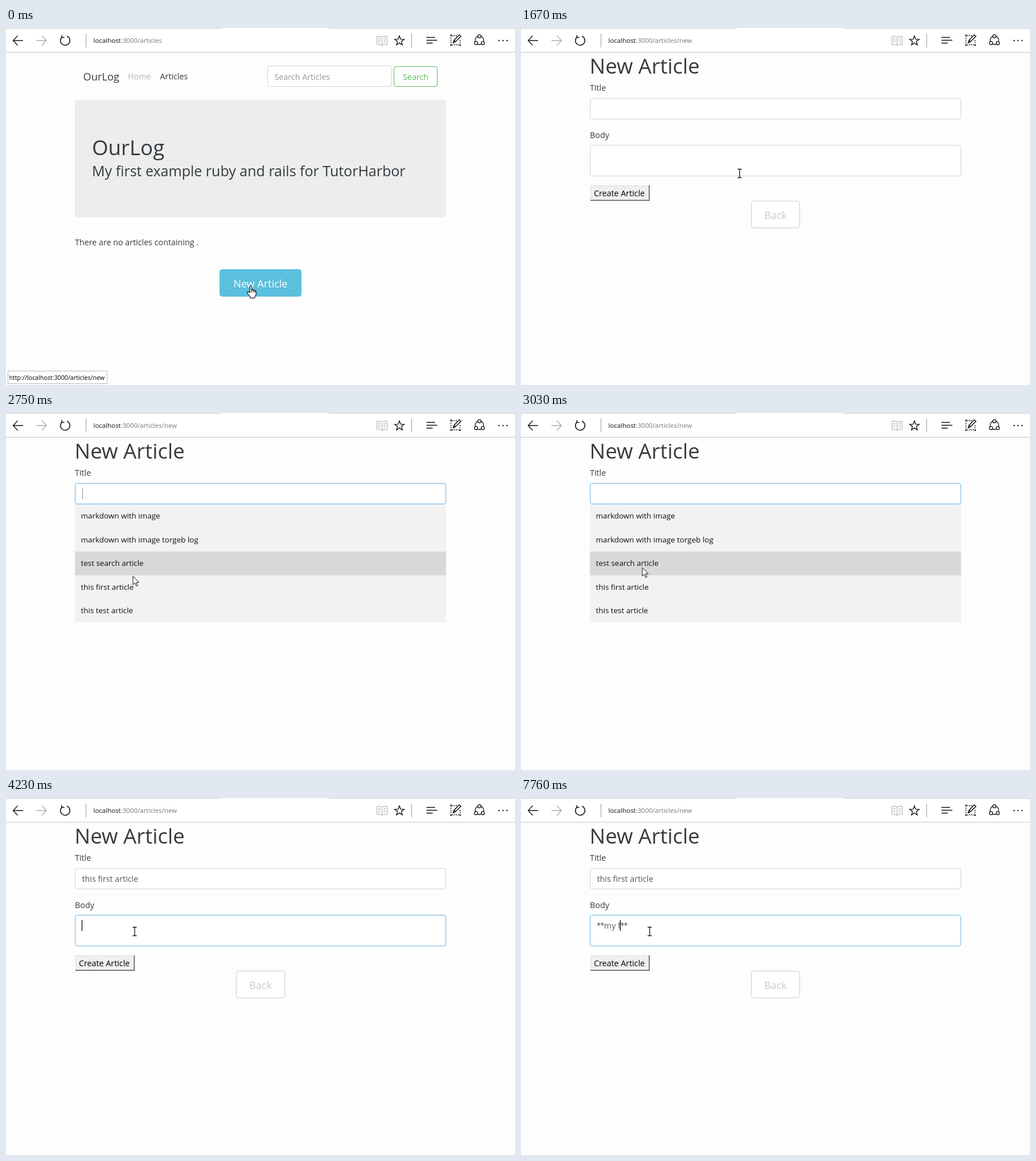
An HTML page that plays this animation: 894x626 px, repeating every 8000 ms.

```html
<!DOCTYPE html>
<html lang="en">
<head>
<meta charset="utf-8">
<title>New article form</title>
<style>
  html, body { margin: 0; width: 100%; height: 100%; overflow: hidden; background: #fdfdfd; }
  svg { display: block; width: 894px; height: 626px; }
  text { font: 14.3px "Open Sans", "Noto Sans", sans-serif; fill: #373a3c; white-space: pre; }
  .h1 { font-size: 36.7px; }
  .h3 { font-size: 25px; }
  .large { font-size: 18px; }
  .brand { font-size: 18.3px; }
  .row { font-size: 13.45px; fill: #111; }
  .url { font-size: 11.5px; fill: #767676; }
  .tip { font-size: 10.7px; fill: #000; }
  .mid { text-anchor: middle; }
  .value { fill: #55595c; }
  .star { font-family: Roboto, sans-serif; }
  .field { fill: #fff; stroke: #d3d3d3; }
  .field.focus { stroke: #66afe9; }
  .icon { fill: none; stroke: #111; stroke-width: 1.3; }
  .dim { stroke: #aaa; }
</style>
</head>
<body>
<svg viewBox="0 0 894 626">
  <rect width="894" height="626" fill="#fdfdfd"/>

  <!-- Browser bar -->
  <rect width="894" height="42" fill="#fff"/>
  <path d="M0 .5H378M567 .5H894M0 42.5H894" stroke="#c8c8c8"/>
  <g class="icon">
    <path d="M30 22H12.5M20.5 13.5L12.5 22L20.5 30.5"/>
    <path class="dim" d="M53.5 22H71M63 13.5L71 22L63 30.5"/>
    <path d="M99 15.3A8.3 8.3 0 1 0 107 14.3M98 12.5V16.5H102.5" stroke-width="1.5"/>
    <path d="M140.5 10V34M712.5 10V34" stroke="#999" stroke-width="1"/>
    <path class="dim" d="M651.5 14.5H658L660.5 16L663 14.5H669.5V29H663L660.5 30.5L658 29H651.5ZM660.5 16V30M654 18.5H657.5M654 21.5H657.5M654 24.5H657.5M663.5 18.5H667M663.5 21.5H667M663.5 24.5H667" stroke-width="1"/>
    <path id="bookmark"/>
    <path d="M738.5 16.5H753.5M738.5 21.5H757.5M738.5 26.5H749.5"/>
    <path d="M792 13.5H781.5V29.5H797.5V20" stroke-dasharray="2 1.5"/>
    <path d="M785.5 26L787 21.5L796 12L799 14.5L789.5 24ZM787 21.5L789.5 24M780 12.5H783M780 30.5H783M796 30.5H799" stroke-width="1.5"/>
    <circle cx="831.5" cy="21.5" r="7.5"/>
    <g fill="#fff">
      <circle cx="831.5" cy="14.5" r="2.8"/>
      <circle cx="825.5" cy="26.5" r="2.8"/>
      <circle cx="837.5" cy="26.5" r="2.8"/>
    </g>
  </g>
  <g fill="#111"><circle cx="866" cy="22" r="1.2"/><circle cx="873" cy="22" r="1.2"/><circle cx="880" cy="22" r="1.2"/></g>
  <text class="url" x="153.5" y="26"><tspan fill="#111">localhost</tspan>:3000/articles<tspan id="path"></tspan></text>

  <!-- Article list -->
  <g id="list">
    <text class="brand" x="135.5" y="92">OurLog</text>
    <text x="214" y="90" style="fill:#b5b6b7">Home</text>
    <text x="270.5" y="90">Articles</text>
    <rect class="field" x="459.5" y="66.5" width="218" height="36" rx="3.5"/>
    <text x="471.5" y="91" style="fill:#999">Search Articles</text>
    <rect x="681.5" y="67.5" width="76" height="35" rx="3.5" fill="#fff" stroke="#5cb85c"/>
    <text class="mid" x="719.5" y="91" style="fill:#5cb85c">Search</text>
    <rect x="121" y="126.5" width="652" height="205.5" rx="5" fill="#ebedee"/>
    <text class="h1" x="151" y="223">OurLog</text>
    <text class="h3" x="151" y="260">My first example ruby and rails for TutorHarbor</text>
    <text x="121" y="380.5">There are no articles containing .</text>
    <rect id="add" x="375.5" y="423.5" width="143" height="47" rx="4"/>
    <text class="large mid" x="447" y="455" style="fill:#fff">New Article</text>
  </g>

  <!-- Article form -->
  <g id="form">
    <text class="h1" x="120.5" y="80">New Article</text>
    <text x="121" y="110">Title</text>
    <rect id="title" class="field" x="121.5" y="123.5" width="651" height="36" rx="3.5"/>
    <text id="titleText" class="value" x="133.5" y="147">this first article</text>
    <path id="titleCaret" d="M134.5 131V151" stroke="#888"/>
    <text x="121" y="192.5">Body</text>
    <rect id="body" class="field" x="121.5" y="205.5" width="651" height="54" rx="3.5"/>
    <text id="bodyText" class="value" x="133.5" y="229"></text>
    <path id="bodyCaret" d="M0 214V233" stroke="#000" stroke-width="1.3"/>
    <rect x="122" y="276" width="104" height="27" fill="#efefef"/>
    <path d="M122.5 302V276.5H225" fill="none" stroke="#e0e0e0"/>
    <path d="M122 302.3H225.3V276" fill="none" stroke="#555" stroke-width="1.5"/>
    <text x="128" y="295" style="fill:#000">Create Article</text>
    <rect id="back" x="404.5" y="303.5" width="85" height="47" rx="4" stroke="#ccc"/>
    <text id="backText" class="large mid" x="447" y="335">Back</text>
    <g id="menu">
      <rect x="121" y="160" width="652" height="207" fill="#f2f2f2"/>
      <rect id="pick" x="121" width="652" height="41.5" fill="#d8d8d8"/>
    </g>
  </g>

  <g id="status">
    <rect id="statusBox" x="3.5" y="601.5" width="174" height="22" stroke="#bbb"/>
    <text id="statusText" class="tip" x="5.5" y="616.5"></text>
  </g>

  <!-- Pointers, hot spot at 0,0 -->
  <g id="hand" fill="#fff" stroke="#000" stroke-width="1.1" stroke-linejoin="round">
    <path d="M-1.5 11V.5Q-1.5-1 0-1T1.500.5V6.500Q3 5 4.500 7Q6 5.800 7.300 7.800Q9 7 9.300 9V14.500L7 18V20.500H-1V18.500L-6 12Q-7 9.500-4.500 9.500Z"/>
    <path d="M1.5 6V10M4.5 7V10.5M7.3 8V11" fill="none"/>
  </g>
  <path id="beam" d="M-3.5-7.5H-1L0-6.5L1-7.5H3.5M0-6.5V6.5M-3.5 7.5H-1L0 6.5L1 7.5H3.5" fill="none" stroke="#111" stroke-width="1.3"/>
  <path id="arrow" d="M0 0V15L3.5 11.8L6 17.5L8.3 16.5L5.8 11H10.5Z" fill="#fff" stroke="#111"/>
</svg>

<script>
const LOOP = 8000;
const $ = id => document.getElementById(id);
const show = (id, on) => { $(id).style.display = on ? "" : "none"; };

// Each track lists [start, ...values]; a value holds until the next start.
const pointer = [
  [0, "hand", 430, 453], [560, "hand", 446, 436], [700, "arrow", 547, 171],
  [850, "arrow", 530, 300], [980, "hand", 470, 432], [1110, "hand", 457, 428],
  [1670, "beam", 384, 255], [1820, "beam", 330, 207], [1960, "beam", 282, 168],
  [2090, "beam", 252, 147], [2230, "beam", 246, 143], [2630, "arrow", 232, 222],
  [2750, "arrow", 223, 286], [2870, "arrow", 218, 279], [3030, "arrow", 213, 271],
  [3180, "arrow", 211, 284], [3310, "arrow", 209, 298], [3450, "arrow", 208, 303],
  [3850, "hand", 415, 322], [3980, "beam", 300, 250], [4110, "beam", 240, 238],
  [4230, "beam", 226, 234]
];
const addButton = [
  [0, "#5bc0de", "#5bc0de"], [560, "#31b0d5", "#2aabd2"], [700, "#5bc0de", "#5bc0de"],
  [980, "#31b0d5", "#2aabd2"], [1250, "#269abc", "#1f7e9a"], [1550, "#31b0d5", "#2aabd2"]
];
const status = [
  [0, "/new", "#fff"], [560, "/new", "#f2f2f2"], [700, null], [980, "/new", "#f2f2f2"],
  [1550, null], [3850, "", "#f2f2f2"], [3980, null]
];
const focus = [[0, ""], [2230, "title"], [4230, "body"]];
const picked = [[0, -1], [2630, 1], [2750, 2], [3310, 3]];
const titleCaret = [[0, false], [2630, true], [3030, false]];
const typing = [
  [0, "", -1], [4230, "", 0], [4630, "", -1], [4780, "", 0], [5210, "", -1],
  [5350, "*", 1], [5490, "**", 2], [5630, "***", 3], [5900, "****", 4],
  [6270, "****", 3], [6420, "****", 2], [6820, "**m**", 3], [6960, "**my**", 4],
  [7100, "**my **", 5], [7240, "**my f**", 6], [7640, "**my **", 5], [7760, "**my f**", 6]
];
const at = (track, t) => track.findLast(step => step[0] <= t).slice(1);

const rows = ["markdown with image", "markdown with image torgeb log",
  "test search article", "this first article", "this test article"];
$("menu").insertAdjacentHTML("beforeend", rows.map((row, i) =>
  `<text class="row" x="131.5" y="${185 + 41.5 * i}">${row}</text>`).join(""));

const starPoints = Array.from({ length: 10 }, (_, i) => {
  const r = i % 2 ? 3.6 : 8.8, a = (i / 5 - 0.5) * Math.PI;
  return `${691 + r * Math.cos(a)} ${22.5 + r * Math.sin(a)}`;
});
$("bookmark").setAttribute("d", `M${starPoints.join("L")}Z`);

let typed = null;
function drawBody(t) {
  const [text, index] = at(typing, t);
  const el = $("bodyText");
  if (text !== typed) {
    el.innerHTML = text.replace(/\*+/g, '<tspan class="star">$&</tspan>');
    typed = text;
  }
  show("bodyCaret", index >= 0);
  const width = index > 0 ? el.getSubStringLength(0, index) : 0;
  $("bodyCaret").setAttribute("transform", `translate(${Math.round(133.5 + width) - 0.5})`);
}

function draw(t) {
  const onForm = t >= 1670;
  show("list", !onForm);
  show("form", onForm);
  $("path").textContent = t >= 1550 ? "/new" : "";

  const [fill, edge] = at(addButton, t);
  $("add").setAttribute("fill", fill);
  $("add").setAttribute("stroke", edge);

  const [link, shade] = at(status, t);
  show("status", link !== null);
  if (link !== null) {
    $("statusText").textContent = "http://localhost:3000/articles" + link;
    $("statusBox").setAttribute("fill", shade);
    $("statusBox").setAttribute("width", link ? 174 : 150);
  }

  const [focused] = at(focus, t);
  for (const id of ["title", "body"]) $(id).classList.toggle("focus", id === focused);
  show("titleText", t >= 3720);
  show("titleCaret", at(titleCaret, t)[0]);

  const [row] = at(picked, t);
  show("menu", t >= 2360 && t < 3720);
  show("pick", row >= 0);
  $("pick").setAttribute("y", 160 + 41.5 * row);

  const overBack = t >= 3850 && t < 3980;
  $("back").setAttribute("fill", overBack ? "#ccc" : "#fff");
  $("backText").style.fill = overBack ? "#fff" : "#ccc";

  drawBody(t);

  const [kind, x, y] = at(pointer, t);
  for (const id of ["hand", "beam", "arrow"]) show(id, id === kind);
  $(kind).setAttribute("transform", `translate(${x} ${y})`);
}

const start = performance.now();
function tick() {
  draw((performance.now() - start) % LOOP);
  requestAnimationFrame(tick);
}
tick();
</script>
</body>
</html>
```
